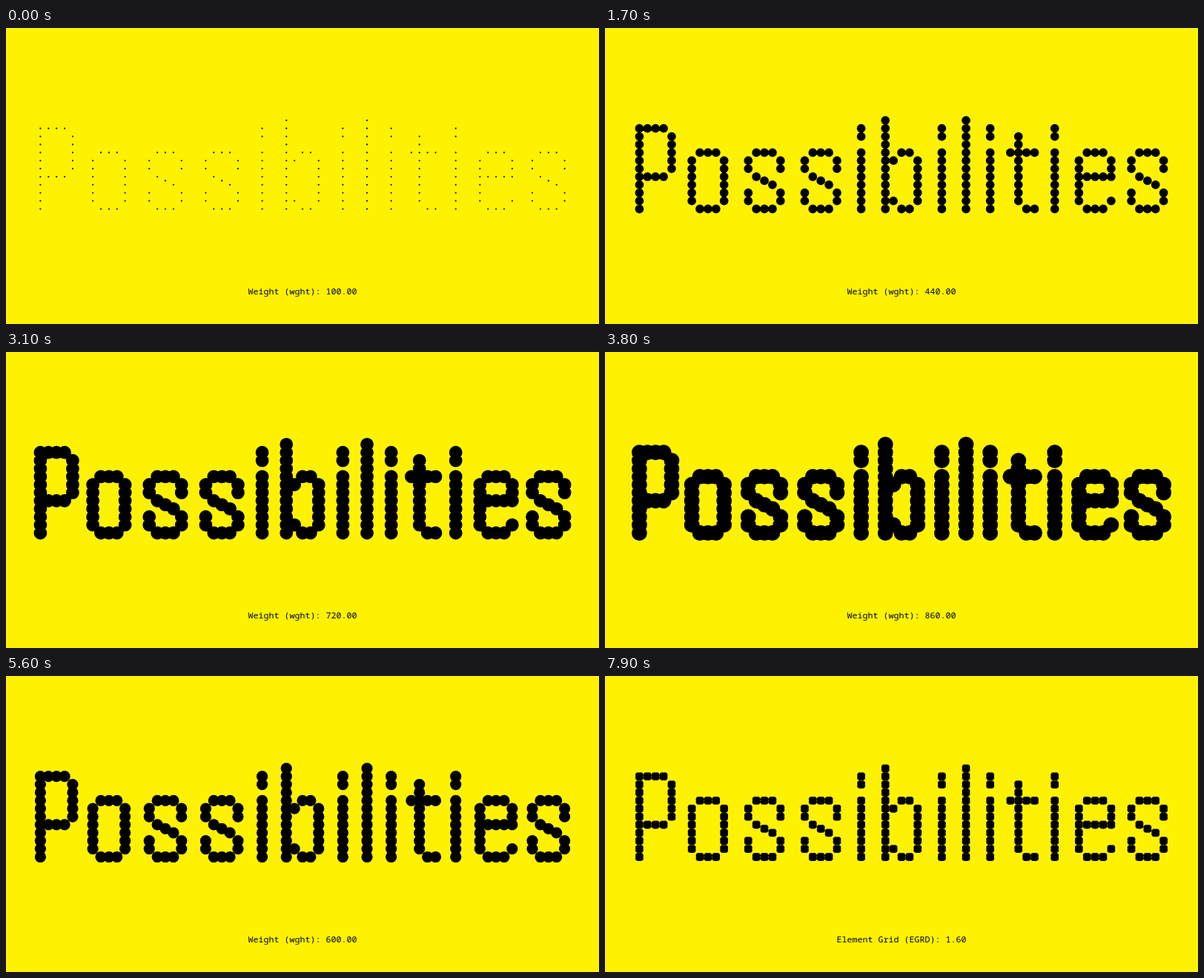
Animation of 800 by 400 pixels, one loop 8 s. Source, as an HTML page:

```html
<!DOCTYPE html>
<html lang="en">
<head>
<meta charset="utf-8">
<title>Possibilities</title>
<style>
  html, body { margin: 0; width: 100%; height: 100%; overflow: hidden; background: #fff200; }
  svg { display: block; width: 800px; height: 400px; }
  #word { fill: none; stroke: #000; stroke-linecap: round; }
  #label { font: 500 11.667px "Noto Sans Mono", monospace; text-anchor: middle; white-space: pre; }
</style>
</head>
<body>
<svg viewBox="0 0 800 400">
  <path id="word"/>
  <text id="label" x="400" y="360"></text>
</svg>
<script>
const PITCH = 10.88, LEFT = 400 - 32.5 * PITCH, BASE = 244.5;
const LOOP = 8000, STEP = 100;

// Cells are [column, row], with rows counted up from the baseline.
const range = (a, b) => Array.from({ length: b - a + 1 }, (_, i) => a + i);
const col = (x, a, b) => range(a, b).map(y => [x, y]);
const row = (y, a, b) => range(a, b).map(x => [x, y]);

const glyphs = {
  P: [...col(0, 0, 10), ...row(10, 1, 3), ...col(4, 5, 9), ...row(4, 1, 3)],
  o: [...row(0, 1, 3), ...row(7, 1, 3), ...col(0, 1, 6), ...col(4, 1, 6)],
  s: [...row(0, 1, 3), ...row(7, 1, 3), ...col(0, 1, 2), ...col(4, 1, 2),
      ...col(0, 5, 6), ...col(4, 5, 6), [1, 4], [2, 3.5], [3, 3]],
  i: [...col(0, 0, 7), ...col(0, 9, 10)],
  b: [...col(0, 0, 11), [1, 1], [1, 6], ...row(0, 2, 3), ...row(7, 2, 3), ...col(4, 1, 6)],
  l: col(0, 0, 11),
  t: [...col(1, 1, 9), [0, 7], [2, 7], [3, 7], ...row(0, 2, 3)],
  e: [...row(0, 1, 3), ...row(7, 1, 3), ...col(0, 1, 6), ...row(4, 1, 4),
      ...col(4, 5, 6), [4, 1]]
};

const starts = [0, 6.5, 13.5, 20.5, 27.5, 30.5, 37.5, 40.5, 43.5, 46, 51.5, 54.5, 61];
const dots = [..."Possibilities"].flatMap((ch, i) =>
  glyphs[ch].map(([x, y]) => [LEFT + (starts[i] + x) * PITCH, BASE - y * PITCH]));

// Dot diameter in grid cells: 0.2 at 100, 1 at 400, 2 at 900.
const diameter = w => w < 400 ? 0.2 + (w - 100) / 375 : 1 + (w - 400) / 500;

function pose(n) {
  if (n <= 40) return { weight: 100 + 20 * n, grid: 1 };
  if (n <= 66) return { weight: 900 - 20 * (n - 41), grid: 1 };
  return { weight: 400, grid: 1 + 0.05 * (n - 67), showGrid: true };
}

const word = document.getElementById("word");
const label = document.getElementById("label");

// Each dot is four round caps that drift apart as the grid value rises.
function draw({ weight, grid, showGrid }) {
  const size = diameter(weight) * PITCH;
  const off = (grid - 1) * size / 4;
  const corners = off ? [[-off, -off], [off, -off], [-off, off], [off, off]] : [[0, 0]];
  word.setAttribute("stroke-width", size * (1 - (grid - 1) / 2));
  word.setAttribute("d", dots.flatMap(([x, y]) =>
    corners.map(([dx, dy]) => `M${(x + dx).toFixed(3)} ${(y + dy).toFixed(3)}h0`)).join(""));
  label.textContent = showGrid
    ? `Element Grid (EGRD): ${grid.toFixed(2)}`
    : `Weight (wght): ${weight.toFixed(2)}`;
}

let shown = -1;
const start = performance.now();
function tick() {
  const n = Math.floor(((performance.now() - start) % LOOP) / STEP);
  if (n !== shown) draw(pose(shown = n));
  requestAnimationFrame(tick);
}
tick();
</script>
</body>
</html>
```
